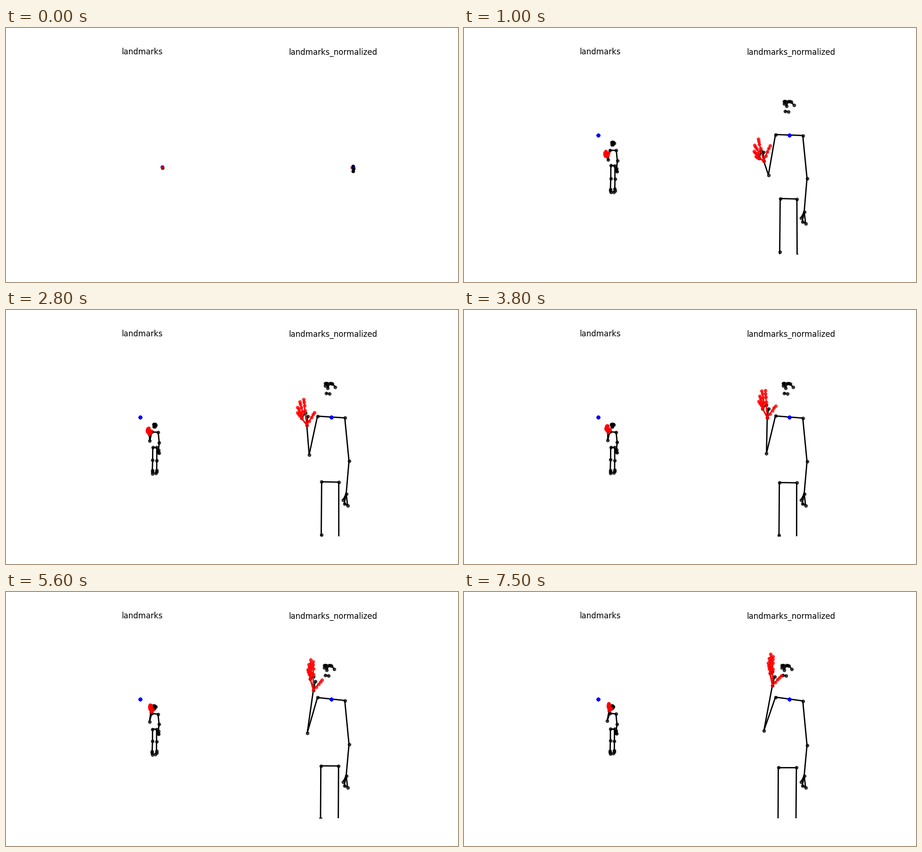
Recreate the animation shown at these times as a matplotlib script. Size 960x540 px, loop 8 s.

```python
import numpy as np
import matplotlib.pyplot as plt
from matplotlib.animation import FuncAnimation
from matplotlib.collections import LineCollection

W, H, DPI = 960, 540, 100
TICK, TICKS = 100, 80
# ticks at which a new pose is shown; it then holds until the next one
STEPS = np.floor(1 + 9.3 * np.arange(9)).astype(int)
CHEST = np.array([690, 227])


def mix(a, b, t):
    return np.asarray(a) * (1 - t) + np.asarray(b) * t


def polar(length, degrees):
    """Vector of a given length, turned clockwise from straight up."""
    a = np.radians(degrees)
    return length * np.array([np.sin(a), -np.cos(a)])


def chain(*ids):
    return list(zip(ids, ids[1:]))


POSE_LINKS = (
    chain(0, 1, 2, 3, 7) + chain(0, 4, 5, 6, 8) + chain(9, 10)
    + chain(11, 13, 15, 17, 19, 15, 21) + chain(12, 14, 16, 18, 20, 16, 22)
    + chain(11, 12) + chain(23, 24)
    + chain(23, 25, 27, 29, 31, 27) + chain(24, 26, 28, 30, 32, 28))
HAND_LINKS = chain(0, 5, 9, 13, 17, 0) + chain(0, 1, 2, 3, 4) + [
    link for k in (5, 9, 13, 17) for link in chain(k, k + 1, k + 2, k + 3)]


def face(t):
    nose = np.array([(684, 165)])
    left_eye = np.linspace((688.5, 155), (694, 156), 3)
    right_eye = np.linspace((682.5, 155), (679, 155), 3)
    ears_mouth = [(700, 163), (679, 160), (688, 177), (681, 176)]
    return np.vstack([nose, left_eye, right_eye, ears_mouth]) + (-4.5 * t, .3)


def fingers(raised):
    """Tip vectors from the wrist: thumb, then index to pinky."""
    tips = [polar(35 - 7 * raised, 22 + 20 * raised)]
    for k, reach in enumerate((62, 67, 58, 48)):
        tips.append(polar(mix(48 - 9.7 * k, reach, raised),
                          -14.5 - 15.5 * k + (15.5 + 11.5 * k) * raised))
    return tips


def hand(wrist, tips):
    pts = [wrist]
    for k, tip in enumerate(tips):
        joints = (.56, .76, .89, 1) if k else (.32, .6, .82, 1)
        pts += [wrist + tip * f for f in joints]
    return np.array(pts)


def figure_at(t):
    """Body and raised hand; the forearm lifts with a quadratic ease-out."""
    raised = 1 - (1 - t) ** 2
    r_shoulder = np.array([661, 226 - 3 * t])
    r_elbow = mix((646, 312), (636.5, 294), t)
    r_wrist = r_elbow + polar(31.6 + 66 * raised, -18.4 + 29 * raised)
    l_elbow, l_wrist = np.array([728, 319 + 6 * t]), np.array([722, 390])
    tips = fingers(raised)
    l_thumb = l_wrist + (-6.5, 13)
    r_hip, l_hip = mix((671, 362), (667, 372), t), mix((706.5, 363), (705.5, 372), t)
    r_knee, l_knee = mix((670, 475), (666.5, 484), t), mix((707, 483), (704.5, 488), t)
    body = np.vstack([face(t), [
        2 * CHEST - r_shoulder, r_shoulder, l_elbow, r_elbow, l_wrist, r_wrist,
        l_thumb + (9.5, 12), r_wrist + tips[4] * .55,
        l_thumb + (2.5, 8), r_wrist + tips[1] * .47,
        l_thumb, r_wrist + polar(19, -3 + 17 * raised),
        l_hip, r_hip, l_knee, r_knee,
        l_knee + (-1, 86), r_knee + (-3, 96), l_knee + (0, 102), r_knee + (-3, 109),
        l_knee + (-10, 115), r_knee + (0, 124)]])
    return body, hand(r_wrist, tips)


class Skeleton:
    def __init__(self, ax, links, color, zorder):
        self.links = np.array(links)
        self.lines = LineCollection([], colors=color, linewidths=2, zorder=zorder)
        ax.add_collection(self.lines, autolim=False)
        self.dots = ax.scatter([], [], s=20, color=color, alpha=.72, zorder=zorder + 1)

    def place(self, pts):
        self.lines.set_segments(pts[self.links])
        self.dots.set_offsets(pts)

    def show(self, on):
        self.lines.set_visible(on)
        self.dots.set_visible(on)


class Panel:
    def __init__(self, ax, title, origin, heap):
        box = ax.get_position()
        ax.set_title(title, fontsize=12, family="DejaVu Sans")
        # data units are pixels of the whole stage
        ax.set_xlim(box.x0 * W - .5, box.x1 * W - .5)
        ax.set_ylim((1 - box.y0) * H - .5, (1 - box.y1) * H - .5)
        ax.axis("off")
        self.body = Skeleton(ax, POSE_LINKS, "black", 2)
        self.hand = Skeleton(ax, HAND_LINKS, "red", 4)
        # the undetected hand: every landmark sits on the origin
        self.lost = Skeleton(ax, HAND_LINKS, "blue", 6)
        self.lost.place(np.tile(origin, (21, 1)))
        x, y, size, color = zip(*heap)
        self.heap = ax.scatter(x, y, s=size, color=color, zorder=8)

    def draw(self, pose):
        for part in (self.body, self.hand, self.lost):
            part.show(pose is not None)
        self.heap.set_visible(pose is None)
        if pose is not None:
            self.body.place(pose[0])
            self.hand.place(pose[1])


fig, axes = plt.subplots(1, 2, figsize=(W / DPI, H / DPI), dpi=DPI, facecolor="white")
raw = Panel(axes[0], "landmarks", (284, 227), [
    (332, 295.5, 20, "black"), (332.3, 297.3, 20, "black"), (331.3, 295.3, 16, "blue"),
    (332.3, 296.4, 14, "red"), (332.4, 296.4, .2, "black")])
normalized = Panel(axes[1], "landmarks_normalized", CHEST, [
    (735, 296.7, 20, "red"), (737, 293.8, 20, "black"), (738, 298.8, 20, "black"),
    (737, 304.3, 20, "black"), (739.3, 295.6, 4, "blue")])


def update(n):
    step = np.searchsorted(STEPS, n, side="right") - 1
    if step < 0:
        raw.draw(None)
        normalized.draw(None)
        return []
    t = (STEPS[step] - STEPS[1]) / (STEPS[-1] - STEPS[1])
    pose = figure_at(t)
    center, scale = mix((316, 259.5), (315.7, 258), t), mix(.24, .225, t)
    normalized.draw(pose)
    raw.draw([center + scale * (pts - CHEST) for pts in pose])
    return []


anim = FuncAnimation(fig, update, frames=TICKS, interval=TICK,
                     repeat=True, repeat_delay=0, blit=False)
plt.show()
```
